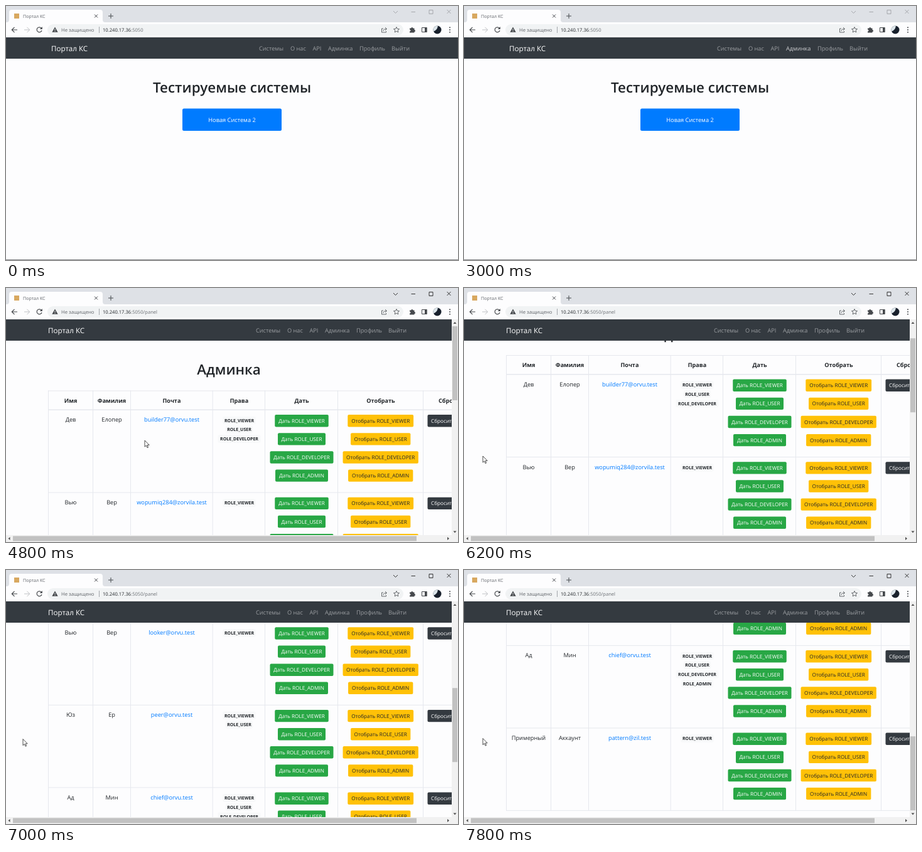
Recreate the animation shown at these times as an HTML page. Size 720 by 405 pixels, loop 8000 ms.

```html
<!DOCTYPE html>
<html lang="ru">
<head>
<meta charset="utf-8">
<style>
html, body { margin: 0; width: 100%; height: 100%; overflow: hidden; background: #fdfdfe; }
svg { display: block; }
text { font-family: "Open Sans", "Noto Sans", sans-serif; text-rendering: geometricPrecision; white-space: pre; }
</style>
</head>
<body>
<svg id="stage" width="720" height="405" viewBox="0 0 720 405"></svg>
<script>
const INK = '#212529', SLATE = '#343a40', PAPER = '#fdfdfe', BAR = '#dee1e6', FIELD = '#f1f3f4', LINE = '#e6e8ee';
const DARK = '#45484c', NAV_LINK = '#9a9da0', TRACK = '#f1f1f1', THUMB = '#c1c1c1';

const rect = (x, y, w, h, fill, r = 0) =>
  `<rect x="${x}" y="${y}" width="${w}" height="${h}" rx="${r}" fill="${fill}"/>`;
const text = (x, y, str, size, fill = INK, anchor = 'start', weight = 400) =>
  `<text x="${x}" y="${y}" font-size="${size}" fill="${fill}" text-anchor="${anchor}" font-weight="${weight}">${str}</text>`;
const mid = (x, y, str, size, fill, weight) => text(x, y, str, size, fill, 'middle', weight);
const stroke = (d, color = DARK, width = 1) =>
  `<path d="${d}" fill="none" stroke="${color}" stroke-width="${width}"/>`;
const shape = (d, fill) => `<path d="${d}" fill="${fill}"/>`;
const button = (cx, cy, w, label, fill, color) =>
  rect(cx - w / 2, cy - 9.7, w, 19.4, fill, 2) + mid(cx, cy + 3, label, 8.2, color);

// Browser frame
const chrome = rect(0, 0, 720, 26, BAR)
  + shape('M1 26Q5 26 5 22V10Q5 6 9 6H150Q154 6 154 10V22Q154 26 158 26Z', PAPER)
  + rect(13, 12, 8, 8, '#d8a860')
  + text(27, 18.7, 'Портал КС', 7.1, '#5f6368')
  + stroke('M141 13.5l5 5m0-5l-5 5M163 16h8M167 12v8')
  + `<g id="controls">${stroke('M617 8l3.5 3.5 3.5-3.5M645.5 9.5h6.5M674 6.5h6v6h-6zM702.5 6l6 6m0-6l-6 6', 'currentColor', .9)}</g>`
  + rect(0, 26, 720, 24, PAPER)
  + stroke('M18 38H9.5M13.5 33.8L9.3 38l4.2 4.2M56.3 35.3A4 4 0 1 0 57 39', DARK, 1.2)
  + shape('M57.8 33v4h-4z', DARK)
  + stroke('M29 38h8.5M33.5 33.8L37.7 38l-4.2 4.2', '#bfc1c4')
  + rect(66, 29, 567, 18, FIELD, 9)
  + shape('M78 33.5l4.7 8.2h-9.4z', DARK) + rect(77.5, 36.5, 1, 2.7, FIELD) + rect(77.5, 40, 1, 1, FIELD)
  + text(88, 40.8, 'Не защищено', 7.7, '#5f6368')
  + rect(148, 33, .8, 10, '#909398')
  + `<text x="154" y="40.8" font-size="7.6" fill="${INK}">10.240.17.36<tspan fill="#6c7075">:5050<tspan id="path">/panel</tspan></tspan></text>`
  + stroke('M601 36h-2.5v6h7v-2M601 40q0-3.5 5-3.5M604 34l2.5 2.5-2.5 2.5', DARK, .8)
  + stroke('M622 33.5l1.3 2.9 3.2.3-2.4 2.1.7 3.1-2.8-1.6-2.8 1.6.7-3.1-2.4-2.1 3.2-.3z', DARK, .8)
  + shape('M643 35.5h2.3a1.5 1.5 0 0 1 3 0h2.2v2.4a1.5 1.5 0 0 1 0 3v1.6h-7.5v-2a1.5 1.5 0 0 0 0-3z', DARK)
  + stroke('M662.5 34.5h7.5v7h-7.5z') + rect(667, 34, 3.5, 8, DARK)
  + '<circle cx="687" cy="38" r="6.5" fill="#18202c"/>' + shape('M688 31.6A6.5 6.5 0 0 0 681 40.5Q687 39 688 31.6', '#dce5ea')
  + [34.2, 38, 41.8].map(y => `<circle cx="707" cy="${y}" r="1" fill="${DARK}"/>`).join('');

const links = [['Системы', 403], ['О нас', 453], ['API', 488.5], ['Админка', 513], ['Профиль', 563], ['Выйти', 614]];
const nav = rect(0, 49.5, 730, 34.5, SLATE)
  + text(72, 71.8, 'Портал КС', 11.6, '#fff')
  + links.map(([label, x], i) => `<g id="link${i}" fill="${NAV_LINK}">${text(x, 70.7, label, 9.2, 'inherit')}</g>`).join('');

const home = mid(360, 138.3, 'Тестируемые системы', 22.4, INK, 600)
  + rect(281, 163.5, 158, 35.5, '#007bff', 2.5)
  + mid(360, 184.8, 'Новая Система 2', 9.25, '#fff')
  + rect(0, 404, 720, 1, '#85878a');

// Users table
const edges = [67.5, 138.5, 198.5, 329.2, 412.5, 528.5, 664.5];
const centers = [103, 168.5, 264, 371.5, 471, 597];
const heads = ['Имя', 'Фамилия', 'Почта', 'Права', 'Дать', 'Отобрать'];
const roles = ['VIEWER', 'USER', 'DEVELOPER', 'ADMIN'].map(role => 'ROLE_' + role);
const widths = [85.5, 76, 101, 84];
const TOP = 164, BODY = 194.5, ROW = 131.6;
const users = [
  ['Дев', 'Елопер', 'builder77@orvu.test', 3],
  ['Вью', 'Вер', 'wopumiq284@zorvila.test', 1],
  ['Вью', 'Вер', 'looker@orvu.test', 1],
  ['Юз', 'Ер', 'peer@orvu.test', 2],
  ['Ад', 'Мин', 'chief@orvu.test', 4],
  ['Примерный', 'Аккаунт', 'pattern@zil.test', 1],
];

function userRow([name, surname, mail, count], i) {
  const y = BODY + i * ROW;
  const badges = roles.slice(0, count).map((role, k) => {
    const w = widths[k] - 33;
    return rect(371.5 - w / 2, y + 10.3 + k * 14.7, w, 12.5, '#f8f9fa', 2)
      + mid(371.5, y + 19.2 + k * 14.7, role, 7, INK, 700);
  });
  const actions = roles.map((role, k) => {
    const cy = y + 17.3 + k * 29.1;
    return button(471, cy, widths[k], 'Дать ' + role, '#28a745', '#fff')
      + button(596.7, cy, widths[k] + 19.3, 'Отобрать ' + role, '#ffc107', INK);
  });
  return [name, surname].map((s, k) => mid(centers[k], y + 18.9, s, 9.2)).join('')
    + mid(264, y + 18.9, mail, 9.25, '#007bff')
    + badges.join('') + actions.join('')
    + rect(671.5, y + 7.6, 60, 19.4, SLATE, 2) + text(677, y + 20.3, 'Сбросить', 8.2, '#fff')
    + rect(67, y + ROW - .5, 660, 1, LINE);
}

const admin = mid(355, 138.3, 'Админка', 22.4, INK, 600)
  + edges.map(x => rect(x - .5, TOP - .5, 1, BODY - TOP + 6 * ROW + .5, LINE)).join('')
  + rect(67, TOP - .5, 660, 1, LINE) + rect(67, BODY - 1, 660, 1.5, LINE)
  + heads.map((h, i) => mid(centers[i], 182.8, h, 9.1, INK, 700)).join('')
  + text(689, 182.8, 'Сброс', 9.1, INK, 'start', 700)
  + users.map(userRow).join('');

const bars = rect(710, 50, 10, 355, TRACK) + rect(0, 394, 720, 11, TRACK)
  + `<g id="thumb">${rect(711, 61, 8, 118, THUMB)}</g>` + rect(11, 395.5, 643, 8, THUMB)
  + shape('M712.5 57l2.5-3 2.5 3zM712.5 387.5l2.5 3 2.5-3zM6.5 397l-3 2.5 3 2.5zM703 397l3 2.5-3 2.5z', '#505050');

const $ = id => document.getElementById(id);
$('stage').innerHTML = rect(0, 0, 720, 405, PAPER)
  + `<g id="home">${home}</g>`
  + `<g id="admin"><svg x="0" y="50" width="710" height="344" viewBox="0 50 710 344"><g id="page">${admin}</g></svg></g>`
  + `<g id="nav">${nav}</g><g id="bars">${bars}</g>` + chrome
  + '<path id="cursor" d="M0 0V10.2L2.4 8 4 11.7 5.6 11 4 7.4H7.2Z" fill="#fff" stroke="#222" stroke-width=".8"/>';

// Linear interpolation through [time, value] points
function track(points, t) {
  const i = points.findIndex(p => p[0] > t);
  if (i < 0) return points[points.length - 1][1];
  if (!i) return points[0][1];
  const [t0, v0] = points[i - 1], [t1, v1] = points[i];
  return v0 + (v1 - v0) * (t - t0) / (t1 - t0);
}

const scrollY = [[6000, 0], [6200, 56.5], [7000, 374], [7400, 582.5], [7600, 598], [7800, 600.5]];
const cursorX = [[3400, 531], [4800, 221], [5000, 221], [5800, 30], [6200, 30], [7000, 27], [7400, 28], [7800, 30]];
const cursorY = [[3400, 66], [4800, 243], [5000, 243], [5800, 268], [6200, 268], [7000, 269.5], [7800, 268.5]];

const show = (id, on) => $(id).setAttribute('display', on ? 'inline' : 'none');
const move = (id, x, y) => $(id).setAttribute('transform', `translate(${x} ${y})`);

function draw(now) {
  const t = Math.floor(now % 8000 / 200) * 200;
  const onAdmin = t >= 3600, focused = t >= 3400, y = track(scrollY, t);
  show('home', !onAdmin);
  for (const id of ['admin', 'bars', 'path']) show(id, onAdmin);
  show('cursor', focused);
  $('controls').style.color = focused ? '#222' : '#a0a2a6';
  $('link3').setAttribute('fill', t >= 3000 && !onAdmin ? '#cdced0' : NAV_LINK);
  move('nav', onAdmin ? -5 : 0, 0);
  move('page', 0, -y);
  move('thumb', 0, y / 2.94);
  move('cursor', track(cursorX, t), track(cursorY, t));
}

const start = performance.now();
(function loop() {
  draw(performance.now() - start);
  requestAnimationFrame(loop);
})();
</script>
</body>
</html>
```
